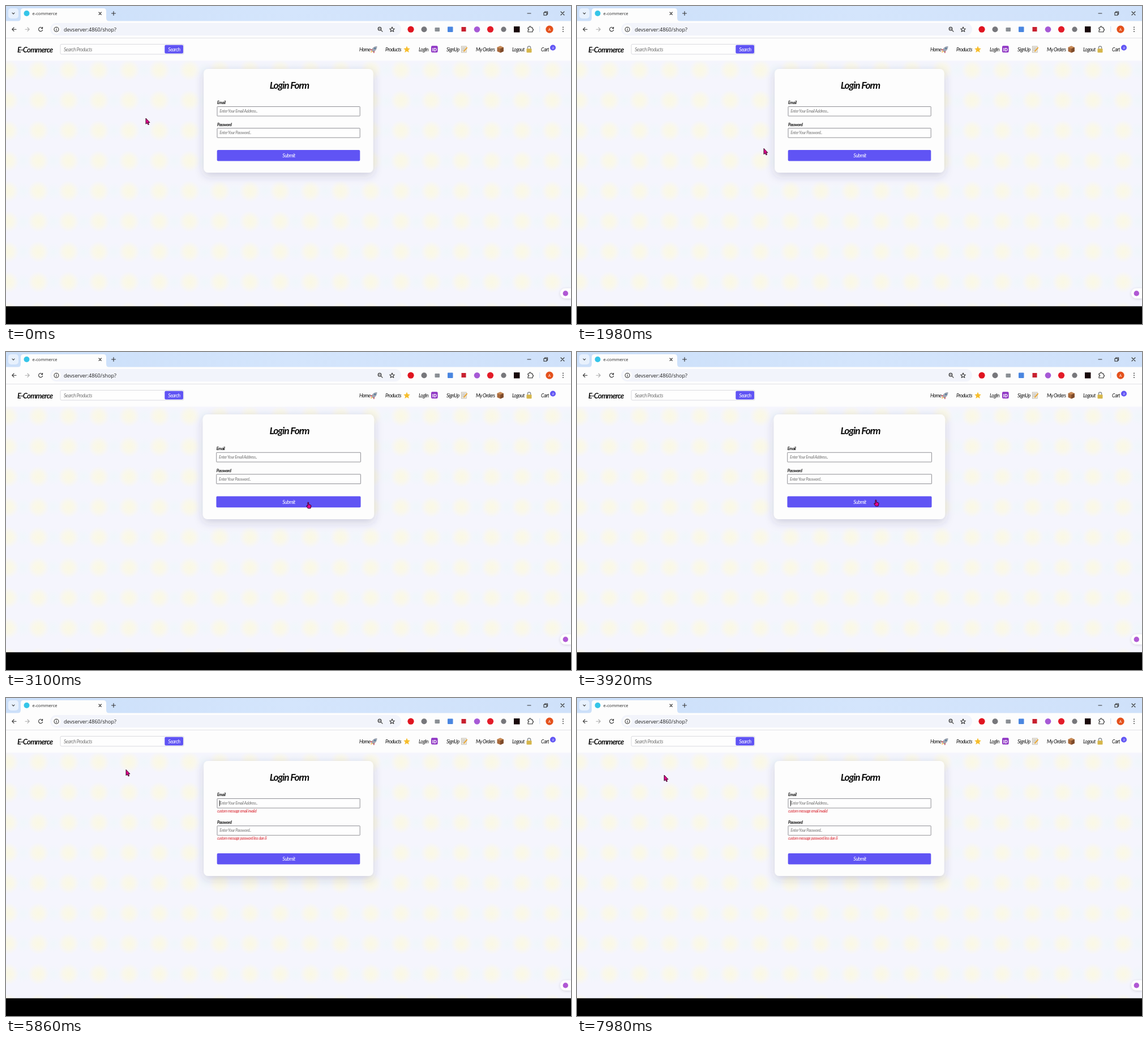
Write an HTML page that moves like this. It is 998 px wide and 561 px high and loops after 8 s.

```html
<!DOCTYPE html>
<html lang="en">
<head>
<meta charset="utf-8">
<title>Login form</title>
<style>
html, body { margin: 0; width: 100%; height: 100%; overflow: hidden; background: #000; }
svg { display: block; width: 100%; height: 100%; }
text { font-family: "Open Sans", "Noto Sans", sans-serif; white-space: pre; }
.hand { font-family: Lato, "Open Sans", sans-serif; font-style: italic; letter-spacing: -.06em; }
.line { fill: none; stroke: #333; stroke-width: 1.1; stroke-linecap: round; stroke-linejoin: round; }
</style>
</head>
<body>
<svg id="stage" viewBox="0 0 998 561" xmlns="http://www.w3.org/2000/svg">
  <defs>
    <linearGradient id="strip">
      <stop offset="0" stop-color="#cbdff9"/>
      <stop offset=".5" stop-color="#d4e5fc"/>
      <stop offset="1" stop-color="#cfe1fa"/>
    </linearGradient>
    <radialGradient id="spot">
      <stop offset="0" stop-color="#faf8e4"/>
      <stop offset=".5" stop-color="#faf8e8" stop-opacity=".85"/>
      <stop offset="1" stop-color="#faf8ea" stop-opacity="0"/>
    </radialGradient>
    <radialGradient id="mint">
      <stop offset="0" stop-color="#eff7fa" stop-opacity=".8"/>
      <stop offset="1" stop-color="#eff7fa" stop-opacity="0"/>
    </radialGradient>
    <pattern id="paper" x="30.4" y="86.6" width="53.4" height="53.4" patternUnits="userSpaceOnUse">
      <rect width="53.4" height="53.4" fill="#f5f5fd"/>
      <circle cx="0" cy="26.7" r="16" fill="url(#mint)"/>
      <circle cx="53.4" cy="26.7" r="16" fill="url(#mint)"/>
      <circle cx="26.7" cy="26.7" r="19" fill="url(#spot)"/>
    </pattern>
    <filter id="shadow" x="-20%" y="-20%" width="140%" height="150%">
      <feDropShadow dx="0" dy="5" stdDeviation="8" flood-color="#3c3c64" flood-opacity=".2"/>
    </filter>
    <filter id="soft" x="-50%" y="-50%" width="200%" height="200%">
      <feDropShadow dx="0" dy="1" stdDeviation="2" flood-color="#445" flood-opacity=".2"/>
    </filter>
  </defs>
  <g id="page"></g>
  <g id="browser"></g>
  <g id="card"></g>
  <g id="arrow"><path d="M0 0V10.2L2.3 8.2L4 11.6L5.6 10.8L4 7.5H7Z" fill="#e2008e" stroke="#250018" stroke-width=".9" stroke-linejoin="round"/></g>
  <g id="pointer"><path d="M0 .4Q1-.6 1.8.5V4L5.3 4.9Q6.2 5.4 6 6.8L5 10.8H.4L-2.2 6.8Q-2.2 5.5-.9 6L0 6.9Z" fill="#e2008e" stroke="#250018" stroke-width=".9" stroke-linejoin="round"/></g>
</svg>
<script>
const LOOP = 8000;
const HOVER_IN = 2760, HOVER_OUT = 5540, SUBMIT = 4560, OVER_BUTTON = 3090;
const $ = id => document.getElementById(id);
const VIOLET = '#6054f4';

const rect = (x, y, w, h, fill, extra = '') =>
  `<rect x="${x}" y="${y}" width="${w}" height="${h}" fill="${fill}" ${extra}/>`;
const dot = (x, y, r, fill) => `<circle cx="${x}" cy="${y}" r="${r}" fill="${fill}"/>`;
const line = (d, extra = '') => `<path class="line" d="${d}" ${extra}/>`;
const text = (x, y, size, str, fill = '#222', extra = '') =>
  `<text x="${x}" y="${y}" font-size="${size}" fill="${fill}" ${extra}>${str}</text>`;
const hand = (x, y, size, str, fill = '#111', extra = '') =>
  text(x, y, size, str, fill, `class="hand" ${extra}`);
const BOLD = 'font-weight="700"', MID = 'text-anchor="middle"';

function drawBrowser() {
  const tabs = [
    rect(0, 0, 998, 28, 'url(#strip)'),
    rect(4, 4, 18, 18, '#e8f1fd', 'rx="5"'),
    line('M11 12L13 14.2L15 12'),
    '<path d="M20 27Q26 27 26 21V9Q26 4 31 4H172Q177 4 177 9V21Q177 27 183 27Z" fill="#fdfdfd"/>',
    dot(36.5, 13, 5, '#35c5e8'),
    text(46.5, 16, 7.6, 'e-commerce'),
    line('M164 11L168.4 15.4M168.4 11L164 15.4'),
    line('M186.5 13H193.5M190 9.5V16.5'),
    line('M921 13H927'),
    line('M950 11.5H955V16.2H950ZM951.6 11.3V10H956.6V14.6H955.2', 'stroke-width=".9"'),
    line('M980 10L986 16M986 10L980 16')
  ];
  const bar = [
    rect(0, 26.5, 998, 30, '#fdfdfd'),
    rect(0, 56, 998, .8, '#dedee2'),
    line('M18 41.2H10.8M14 38L10.8 41.2L14 44.4'),
    line('M34 41.2H41.2M38 38L41.2 41.2L38 44.4', 'style="stroke:#aaa"'),
    line('M64 38.8A3.6 3.6 0 1 0 64.6 42.3M64.6 37.2V39.8H62'),
    rect(78, 30, 620, 22, '#f2f4fb', 'rx="11"'),
    dot(89, 41.2, 8, '#fdfdfd'),
    '<circle class="line" cx="89" cy="41.2" r="4"/>',
    line('M89 40.8V43.2M89 39.1V39.2'),
    text(102, 44.6, 9.1, 'devserver:4860/shop?'),
    '<circle class="line" cx="660" cy="40.2" r="2.8"/>',
    line('M662.2 42.4L665 45.2M658.8 40.2H661.2'),
    line('M682 37L683.3 40L686.4 40.2L684 42.2L684.8 45.2L682 43.6L679.2 45.2L680 42.2L677.6 40.2L680.7 40Z'),
    dot(715, 41.2, 5.6, '#e0141f'),
    dot(738.5, 41.2, 5, '#77777b'),
    rect(757.5, 38, 8.5, 7, '#8b9095', 'rx="1"'),
    rect(780, 36.5, 9.5, 9.5, '#4a86e0', 'rx="1"'),
    rect(804.5, 37, 8, 8, '#c8202f'),
    dot(832, 41.2, 5.3, '#a659d6'),
    dot(855.5, 41.2, 5.6, '#e31b28'),
    dot(879, 41.2, 4.6, '#77777b'),
    rect(897, 36, 10.5, 10.5, '#18080b'),
    line('M922 38H924.2Q924.2 35.8 925.7 35.8T927.2 38H930V40.6Q931.6 40.6 931.6 42T930 43.4V45.8H922V43Q923.8 43 923.8 41.8T922 40.6Z'),
    rect(942.3, 36, .9, 10, '#c9d8ee'),
    dot(960, 41.2, 6.6, '#e4511c'),
    text(960, 43.8, 7, 'A', '#fff', MID),
    ...[37.5, 41.2, 44.9].map(y => dot(984, y, .9, '#333'))
  ];
  $('browser').innerHTML = tabs.join('') + bar.join('');
}

function drawIcons() {
  return [
    '<path d="M655.5 71Q649 71 646.5 76L643 77.5L646 78.5L648.2 81L650 83.5L651 79.8Q655.5 77 655.5 71Z" fill="#9fa6b2"/>' +
    '<path d="M646.5 76L643 77.5L646 78.4ZM649 80.6L650 83.8L651 79.6Z" fill="#d8323f"/>' +
    '<path d="M646.2 79L643.5 82.3L647.7 80.7Z" fill="#f5a623"/>' + dot(651.7, 74.7, 1.3, '#3f6f95'),
    '<path d="M708 70.5L709.6 74.6L713.8 75L710.7 77.8L711.7 82L708 79.8L704.3 82L705.3 77.8L702.2 75L706.4 74.6Z" fill="#f7bd2a"/>',
    rect(751, 70.3, 11.6, 11.6, '#8f36c4', 'rx="2"') +
    text(756.8, 79.5, 8.2, 'ID', '#fff', MID + ' ' + BOLD),
    rect(804.2, 71, 9, 11, '#eee8dc', 'stroke="#a9a396" stroke-width=".6"') +
    line('M806 74H811M806 76.3H811M806 78.6H809.5', 'style="stroke:#8d99a6;stroke-width:.6"') +
    line('M809 79.6L814.2 73.6', 'style="stroke:#eba52c;stroke-width:1.8"'),
    '<path d="M867.5 73L873 70.5L878.8 73V80L873.3 82.6L867.5 80Z" fill="#a8693c"/>' +
    '<path d="M867.5 73L873 70.5L878.8 73L873.3 75.2Z" fill="#c98c57"/>' +
    '<path d="M873.3 75.2L878.8 73V80L873.3 82.6Z" fill="#7d4b2b"/>',
    line('M921.4 76V73.4Q921.4 71 924 71T926.6 73.4V76', 'style="stroke:#8e9296;stroke-width:1.5"') +
    rect(919.5, 75.3, 9, 7, '#d6b64a', 'rx="1"')
  ].join('');
}

function drawPage() {
  const links = [[624, 'Home'], [670, 'Products'], [729, 'LogIn'], [778, 'SignUp'],
    [830, 'My Orders'], [894, 'Logout'], [945, 'Cart']];
  $('page').innerHTML = [
    rect(0, 96, 998, 434, 'url(#paper)'),
    rect(0, 56, 998, 40.5, '#fdfdfd'),
    hand(20, 81.5, 13.2, 'E-Commerce', '#111', BOLD),
    rect(96, 67.5, 218, 17.5, '#fefefe', 'rx="2" stroke="#d6d6dc" stroke-width=".9"'),
    hand(102, 79.5, 8.6, 'Search Products', '#777'),
    rect(280.3, 68.8, 32.7, 15, VIOLET, 'rx="2"'),
    hand(297, 79.5, 8.8, 'Search', '#fff', MID),
    ...links.map(([x, str]) => hand(x, 79.8, 8.8, str)),
    drawIcons(),
    dot(966, 73.5, 5, VIOLET),
    hand(966, 75.7, 6, '0', '#fff', MID),
    '<path d="M998 498H988A9 9 0 0 0 988 516H998Z" fill="#fefefe" filter="url(#soft)"/>',
    dot(988.3, 507, 4.7, '#b058d4'),
    rect(0, 529.7, 998, 32, '#000')
  ].join('');
}

function drawCard(failed) {
  const gap = failed ? 10 : 0;
  const height = 183 + 2 * gap;
  const field = (y, str) =>
    rect(373, y, 252.2, 16.6, '#fefefe', 'rx=".5" stroke="#85858b" stroke-width=".9"') +
    hand(377.3, y + 10.8, 7.3, str, '#777');
  const label = (y, str) => hand(373, y, 7.2, str, '#111', BOLD);
  const error = (y, str) => failed ? hand(373, y, 6.6, str, '#d9232e') : '';
  $('card').innerHTML = [
    rect(349.2, 111, 299.4, height, '#fdfdfd', 'rx="8" filter="url(#shadow)"'),
    hand(500.5, 146, 17.2, 'Login Form', '#0a0a0a', BOLD + ' ' + MID),
    label(173, 'Email'),
    field(177.5, 'Enter Your Email Address..'),
    error(201.5, 'custom message email invalid'),
    label(211.5 + gap, 'Password'),
    field(215.6 + gap, 'Enter Your Password..'),
    error(249.5, 'custom message password less dan 8'),
    rect(372.7, 254 + 2 * gap, 252.6, 19.6, VIOLET, 'rx="2"'),
    hand(499.6, 267 + 2 * gap, 8.8, 'Submit', '#fff', MID),
    '<path id="caret" d="M377.3 180.5V190.8" stroke="#111" stroke-width=".9"/>'
  ].join('');
}

// [time, x, y] of the mouse
const path = [[0, 247, 198], [1700, 247, 198], [2320, 440, 322], [2780, 569, 290],
  [3200, 527, 261], [5100, 527, 261], [5940, 204, 123], [6220, 204, 123], [6620, 154, 136]];

const clamp = v => Math.max(0, Math.min(1, v));
const smooth = v => v * v * (3 - 2 * v);

function mouseAt(t) {
  const i = path.findIndex(p => p[0] > t);
  if (i < 0) return path[path.length - 1].slice(1);
  const [t0, x0, y0] = path[i - 1], [t1, x1, y1] = path[i];
  const k = smooth((t - t0) / (t1 - t0));
  return [x0 + (x1 - x0) * k, y0 + (y1 - y0) * k];
}

let shown = null;

function render(t) {
  const failed = t >= SUBMIT;
  if (failed !== shown) drawCard(shown = failed);

  const hover = smooth(clamp((t - HOVER_IN) / 300)) - smooth(clamp((t - HOVER_OUT) / 300));
  const cy = failed ? 212.5 : 202.5;
  $('card').setAttribute('transform',
    `translate(498.9 ${cy}) scale(${1 + .01 * hover}) translate(-498.9 ${-cy})`);
  $('caret').style.display = failed && (t - SUBMIT) % 1000 < 500 ? '' : 'none';

  const [x, y] = mouseAt(t);
  const overButton = t >= OVER_BUTTON && t < SUBMIT;
  for (const [id, on] of [['arrow', !overButton], ['pointer', overButton]]) {
    $(id).style.display = on ? '' : 'none';
    $(id).setAttribute('transform', `translate(${x} ${y})`);
  }
}

drawPage();
drawBrowser();
const start = performance.now();
function tick() {
  render((performance.now() - start) % LOOP);
  requestAnimationFrame(tick);
}
tick();
</script>
</body>
</html>
```
